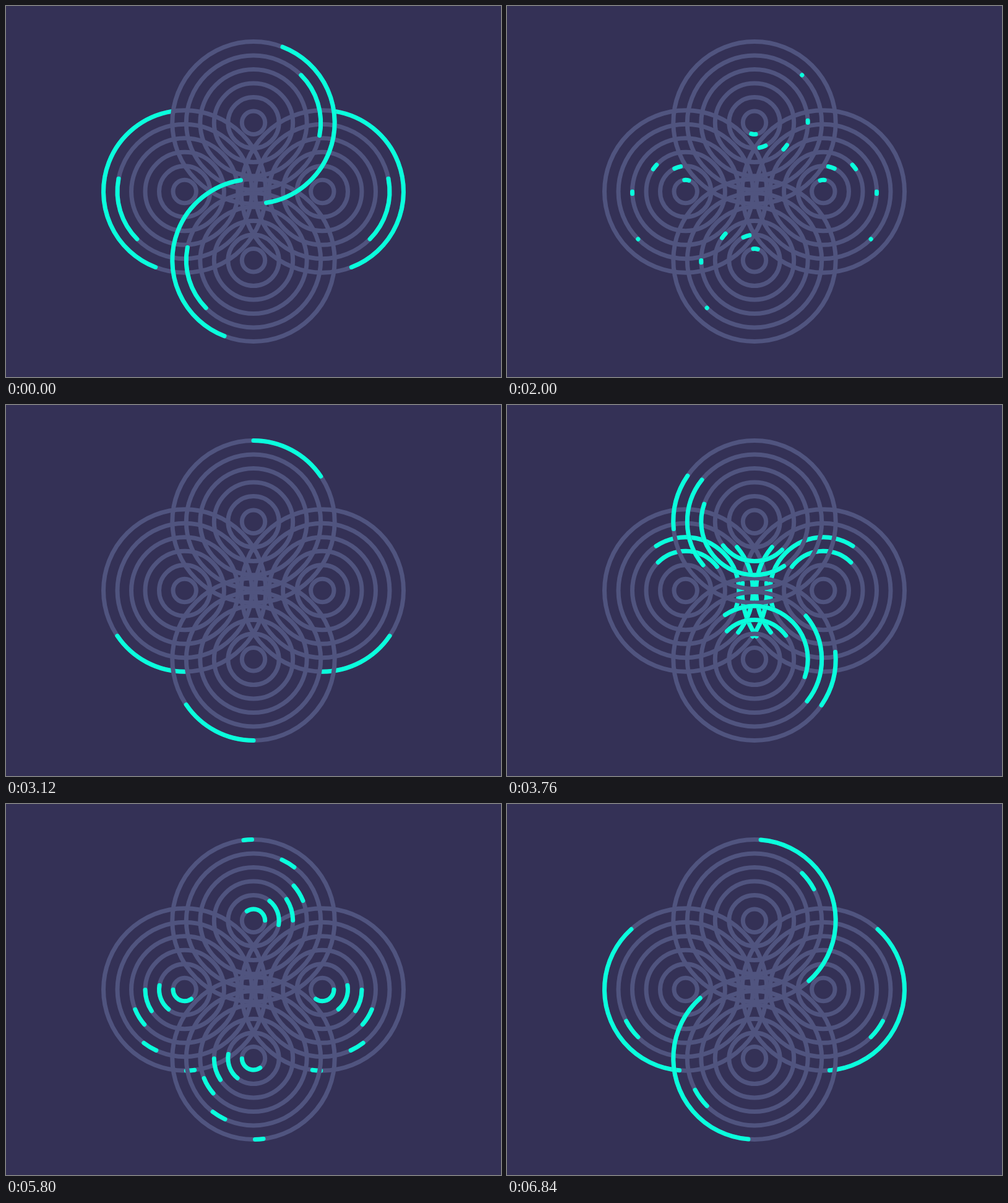
An HTML page with a canvas that plays this animation: 800 by 600 pixels, repeating every 6.88 s.

```html
<!DOCTYPE html>
<html lang="en">
<head>
<meta charset="utf-8">
<title>Four ring clusters</title>
<style>
  html, body { margin: 0; width: 100%; height: 100%; overflow: hidden; background: #343156; }
  canvas { display: block; width: 800px; height: 600px; }
</style>
</head>
<body>
<canvas id="stage" width="800" height="600"></canvas>
<script>
const ctx = document.getElementById('stage').getContext('2d');
const BG = '#343156', TRACK = '#50547f', GLOW = '#0affdc';
const LOOP = 6880, STEP = 40, SWEEP = 1700, REST = 80;
const RINGS = 6, STAGGER = 0.12, LIFE = 1.1;
const OFFSET = 111.3;

// turn: angle of the arc's origin from the top; dir: 1 clockwise, -1 anticlockwise
const left = { x: 400 - OFFSET, y: 300, turn: 180, dir: 1 };
const right = { x: 400 + OFFSET, y: 300, turn: 180, dir: -1 };
const topSet = { x: 400, y: 300 - OFFSET, turn: 0, dir: 1 };
const bottomSet = { x: 400, y: 300 + OFFSET, turn: 180, dir: 1 };

const radius = i => 131.2 - 22.5 * i;

// Smooth monotone curve through [time, degrees] points
function curve(points) {
  const n = points.length;
  const slopes = points.slice(1).map((p, i) => (p[1] - points[i][1]) / (p[0] - points[i][0]));
  const tangents = points.map((p, i) => {
    if (i === 0 || i === n - 1) return 0;
    const a = slopes[i - 1], b = slopes[i];
    return a * b > 0 ? 2 * a * b / (a + b) : 0;
  });
  return x => {
    if (x <= points[0][0]) return points[0][1];
    if (x >= points[n - 1][0]) return points[n - 1][1];
    let i = 0;
    while (x > points[i + 1][0]) i++;
    const [x0, y0] = points[i], [x1, y1] = points[i + 1];
    const w = x1 - x0, u = (x - x0) / w, v = 1 - u;
    return y0 * v * v * (1 + 2 * u) + y1 * u * u * (3 - 2 * u)
      + w * u * v * (tangents[i] * v - tangents[i + 1] * u);
  };
}

const head = curve([[0, 0], [0.04, 17], [0.08, 56], [0.16, 138], [0.2, 171], [0.28, 224],
  [0.4, 279.5], [0.52, 314.5], [0.64, 338], [0.76, 352.3], [0.88, 358.9], [1, 360]]);
const tail = curve([[0, 0], [0.1, 0], [0.16, 4.4], [0.2, 21], [0.28, 100], [0.4, 219],
  [0.52, 282], [0.64, 319], [0.76, 340], [0.88, 353], [1, 358.9], [1.1, 360]]);

// Back-and-forth playhead in seconds, with one short rest at its low point
function playhead(t) {
  const low = 2 * SWEEP - 200;
  if (t >= low && t < low + REST) return 0;
  const p = (t < low ? t + 200 : t - low - REST) % (2 * SWEEP);
  return (p < SWEEP ? p : 2 * SWEEP - p) / 1000;
}

function tracks(set) {
  ctx.strokeStyle = TRACK;
  for (let i = 0; i < RINGS; i++) {
    ctx.beginPath();
    ctx.arc(set.x, set.y, radius(i), 0, 2 * Math.PI);
    ctx.stroke();
  }
}

function arcs(set, time) {
  ctx.strokeStyle = GLOW;
  for (let i = 0; i < RINGS; i++) {
    const local = time - i * STAGGER;
    if (local <= 0.001 || local >= LIFE - 0.001) continue;
    const angle = deg => (set.turn - 90 + set.dir * (i * 45 + deg)) * Math.PI / 180;
    const from = tail(local);
    const to = Math.max(head(local), from + 0.05);
    ctx.beginPath();
    ctx.arc(set.x, set.y, radius(i), angle(from), angle(to), set.dir < 0);
    ctx.stroke();
  }
}

function draw(ms) {
  const time = playhead(Math.floor((ms % LOOP) / STEP) * STEP);
  ctx.fillStyle = BG;
  ctx.fillRect(0, 0, 800, 600);
  ctx.lineWidth = 7;
  ctx.lineCap = 'round';
  const sides = [left, right], ends = [topSet, bottomSet];
  for (const pair of [sides, ends]) {
    pair.forEach(tracks);
    pair.forEach(set => arcs(set, time));
  }
}

let start;
function tick(now) {
  if (start === undefined) start = now;
  draw(Math.max(0, now - start));
  requestAnimationFrame(tick);
}
draw(0);
requestAnimationFrame(tick);
</script>
</body>
</html>
```
